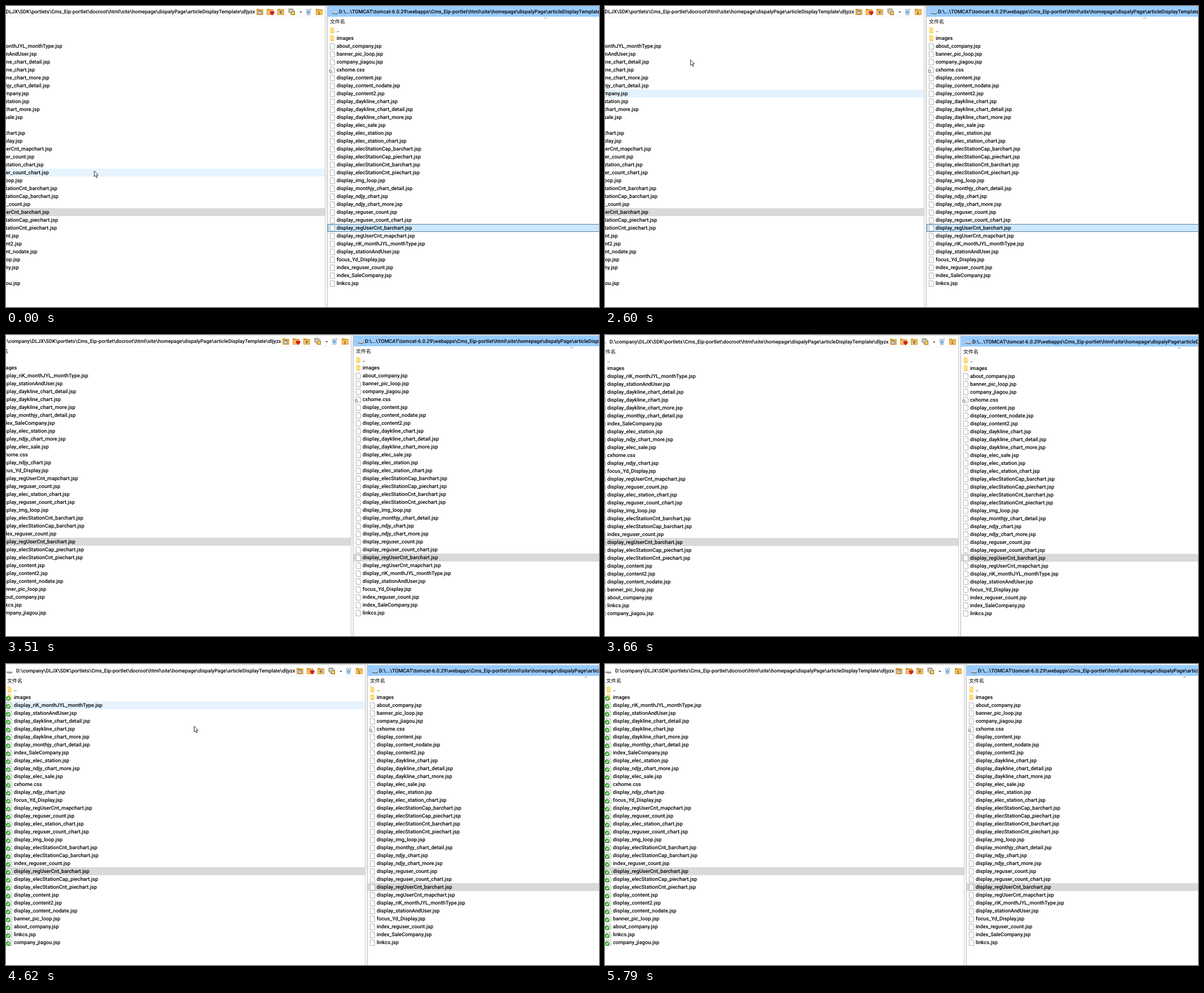
Recreate the animation shown at these times as an HTML page with a canvas. Size 1051 by 533 pixels, loop 7.13 s.

```html
<!DOCTYPE html>
<html lang="en">
<head>
<meta charset="utf-8">
<title>File lists</title>
<style>
html, body { margin: 0; width: 100%; height: 100%; overflow: hidden; background: #fff; }
canvas { display: block; }
</style>
</head>
<body>
<canvas id="stage" width="1051" height="533"></canvas>
<script>
const ctx = document.getElementById('stage').getContext('2d');
const LOOP = 7130, W = 1051, H = 533, ROW = 14, TOP = 45;
const FONT = '500 9.22px Roboto, "Open Sans", sans-serif';
const PATH_FONT = '500 8.98px Roboto, "Open Sans", sans-serif';
const CJK = '500 9px "Noto Sans CJK SC", "Noto Sans CJK", sans-serif';

// names without ".jsp"; "@" stands for "display_"
const expand = s => ['..', 'images'].concat(s.split(' ').map(n =>
  n.replace('@', 'display_') + (n.includes('.') ? '' : '.jsp')));

const leftList = expand('@riK_monthJYL_monthType @stationAndUser @daykline_chart_detail ' +
  '@daykline_chart @daykline_chart_more @monthjy_chart_detail index_SaleCompany @elec_station ' +
  '@ndjy_chart_more @elec_sale cxhome.css @ndjy_chart focus_Yd_Display @regUserCnt_mapchart ' +
  '@reguser_count @elec_station_chart @reguser_count_chart @img_loop @elecStationCnt_barchart ' +
  '@elecStationCap_barchart index_reguser_count @regUserCnt_barchart @elecStationCap_piechart ' +
  '@elecStationCnt_piechart @content @content2 @content_nodate banner_pic_loop about_company ' +
  'linkcs company_jiagou');
const rightList = expand('about_company banner_pic_loop company_jiagou cxhome.css @content ' +
  '@content_nodate @content2 @daykline_chart @daykline_chart_detail @daykline_chart_more ' +
  '@elec_sale @elec_station @elec_station_chart @elecStationCap_barchart ' +
  '@elecStationCap_piechart @elecStationCnt_barchart @elecStationCnt_piechart @img_loop ' +
  '@monthjy_chart_detail @ndjy_chart @ndjy_chart_more @reguser_count @reguser_count_chart ' +
  '@regUserCnt_barchart @regUserCnt_mapchart @riK_monthJYL_monthType @stationAndUser ' +
  'focus_Yd_Display index_reguser_count index_SaleCompany linkcs');
const tail = '\\html\\site\\homepage\\dispalyPage\\articleDisplayTemplate\\dljyzx';
const leftPath = 'D:\\company\\DLJX\\SDK\\portlets\\Cms_Eip-portlet\\docroot' + tail;
const rightPath = 'D:\\...\\TOMCAT\\tomcat-6.0.29\\webapps\\Cms_Eip-portlet' + tail;

// [time, cursor x, cursor y, hovered pane, hovered row]
const pointer = [
  [0, 156, 292, 'L', 18], [2180, 155, 287, 'L', 17], [2330, 154, 245, 'L', 15],
  [2450, 153, 157, 'L', 12], [2600, 151, 95, 'L', 8], [2720, 149, 50, 'L', 4],
  [2840, 147, 20, 'L', 1], [2960, 144, -3], [3110],
  [4620, 333, 110, 'L', 2], [4740, 400, 250, 'L', 9], [4860, 470, 379, 'L', 24],
  [5010, 520, 375, 'L', 24], [5130, 555, 369, 'L', 23], [5280, 579, 398, 'L', 24],
  [5400, 650, 424, 'R', 27], [5520, 712, 449, 'R', 29], [5670, 760, 491, 'R', 31], [5790]
];
// [time, dx, dy]
const pan = [[0, -71, -2], [3380, -48, -1.5], [3510, -25, -1], [3660, -10, -.5],
  [3785, -4, 0], [3910, -1, 0], [4060, 0, 0]];

const at = (steps, t) => steps.filter(s => s[0] <= t).pop();

function rect(x, y, w, h, color) {
  ctx.fillStyle = color;
  ctx.fillRect(x, y, w, h);
}
function label(s, x, y, font = FONT, color = '#000') {
  ctx.font = font;
  ctx.fillStyle = color;
  ctx.fillText(s, x, y);
}
function dot(x, y, r, color) {
  ctx.fillStyle = color;
  ctx.beginPath();
  ctx.arc(x, y, r, 0, 7);
  ctx.fill();
}
function path(pts, fill, stroke, width = 1, closed = true) {
  ctx.beginPath();
  pts.forEach(([x, y]) => ctx.lineTo(x, y));
  if (closed) ctx.closePath();
  if (fill) { ctx.fillStyle = fill; ctx.fill(); }
  if (stroke) { ctx.strokeStyle = stroke; ctx.lineWidth = width; ctx.stroke(); }
}

function page(x, y) {
  path([[x + .5, y - 5], [x + 6, y - 5], [x + 8.5, y - 2.5], [x + 8.5, y + 5.5], [x + .5, y + 5.5]],
    '#fdfdfd', '#a3a3a3', .8);
  path([[x + 6, y - 5], [x + 6, y - 2.5], [x + 8.5, y - 2.5]], null, '#b4b4b4', .6, false);
}
function folder(x, y) {
  rect(x + 1, y - 5, 5, 10, '#f6cf62');
  rect(x + 2, y - 4, 6, 9, '#ffdf83');
  rect(x + 1, y + 4, 7, 1, '#eec058');
}
function check(x, y) {
  dot(x, y, 4.2, '#2b9f25');
  dot(x, y - .6, 3.1, '#4cbb3d');
  path([[x - 2, y + .2], [x - .6, y + 1.7], [x + 2.2, y - 1.8]], null, '#fff', 1.2, false);
}
function gear(x, y) {
  dot(x, y, 2.9, '#9aa8b4');
  dot(x, y, 1.6, '#cfe4f2');
}
function drive(x, y) {
  path([[x, y], [x + 3, y - 2], [x + 10, y - .5], [x + 10, y + 1.5], [x + 7, y + 3], [x, y + 1.5]], '#6d747a');
  path([[x, y], [x + 3, y - 2], [x + 10, y - .5], [x + 7, y + 1]], '#d8dde0');
}

function toolFolder(x) {
  rect(x, 7, 5, 2, '#d79b35');
  rect(x, 8, 12, 10, '#d79b35');
  rect(x + 1, 10, 10, 7, '#f5c365');
}
function toolbar() {
  toolFolder(515);
  dot(521, 13.5, 3.5, '#555');
  dot(521, 13.5, 2.6, '#fff');
  path([[521, 11.5], [521, 13.7], [522.8, 13.7]], null, '#333', .8, false);

  toolFolder(533);
  dot(541, 13.5, 2.4, '#d3202a');
  dot(544.4, 13.5, 2.4, '#d3202a');
  path([[538.9, 14.6], [546.5, 14.6], [542.7, 18.8]], '#d3202a');

  toolFolder(552);
  path([[558, 10.5], [561, 13.5], [559, 13.5], [559, 16], [557, 16], [557, 13.5], [555, 13.5]], '#68717d');

  rect(571.5, 6.5, 8, 7, '#77808a');
  rect(572.5, 7.5, 6, 5, '#f8e58a');
  rect(573.5, 8.5, 8, 7, '#77808a');
  rect(574.5, 9.5, 6, 5, '#fff');
  rect(576, 11, 7, 7, '#8b6a20');
  rect(577, 12, 5, 5, '#f6cf52');

  path([[591.5, 12], [595.5, 12], [593.5, 14.2]], '#222');

  path([[603, 8], [611, 8], [609.8, 18], [604.5, 18]], '#d4e6f1', '#94abb9', .8);
  path([[605, 13], [607, 10.5], [609, 13], [607, 15.5]], null, '#368fd2', 1.2);
  dot(611, 7.5, 1, '#9fb4c0');

  toolFolder(620);
  label('S', 623.8, 16.7, 'bold 7px "Open Sans", sans-serif', '#8d5a10');
}

function rows(list, x, iconX, checked) {
  list.forEach((name, i) => {
    const y = TOP + i * ROW;
    if (i < 2) folder(iconX, y); else page(iconX, y);
    if (checked && i) check(iconX + 2, y + 2);
    else if (name.endsWith('.css')) gear(iconX + 1, y + 2.5);
    label(name, x, y + 3.4);
  });
}
const bar = (x, w, row, color) => rect(x, TOP - 7 + row * ROW, w, ROW, color);

function leftPane(t, hover) {
  ctx.save();
  ctx.beginPath();
  ctx.rect(-80, -5, 716, 560);
  ctx.clip();
  if (t >= 2840 && t < 2960) rect(0, 22, 636, 20, '#d9ebf9');
  else if (t >= 2960 && t < 3380) rect(0, 22, 636, 20, '#fafafa');
  rect(0, 21, 636, 1, '#f2f2f2');
  bar(0, 636, 23, '#d9d9d9');
  if (hover >= 0) bar(0, 636, hover, hover === 23 ? '#cce8ff' : '#e5f3ff');
  drive(1, 14);
  label(leftPath, 18, 15.4, PATH_FONT);
  toolbar();
  label('文件名', 2, 33.3, CJK);
  rows(leftList, 14, 2, true);
  ctx.restore();
}

function rightPane(t, hover) {
  rect(641, 2, 490, 19, '#99ccff');
  drive(649, 14);
  label(rightPath, 661, 15.4, PATH_FONT);
  path([[1025, 24.5], [1027.5, 22.3], [1030, 24.5]], null, '#666', .8, false);
  label('文件名', 645, 33.3, CJK);
  if (t < 3380) {
    bar(641, 490, 25, '#cce8ff');
    ctx.strokeStyle = '#56819f';
    ctx.lineWidth = 1;
    ctx.strokeRect(641.5, 388.5, 490, 13);
  } else bar(641, 490, 25, '#d9d9d9');
  if (hover >= 0) bar(641, 490, hover, '#e5f3ff');
  rows(rightList, 657, 645, false);
}

function frameLines() {
  rect(0, 0, 1130, 2, '#f3f3f3');
  rect(381, 0, 255, 2, '#e2e2e2');
  rect(636, 0, 5, 560, '#f0f0f0');
  rect(636, 0, 1, 560, '#d2d2d2');
  rect(640, 0, 1, 560, '#bdbdbd');
  rect(637, 372, 3, 180, '#f8f8f8');
}

function arrow(x, y) {
  path([[0, 0], [0, 10.2], [2.3, 8.1], [4, 12], [5.6, 11.3], [4, 7.6], [7, 7.4]]
    .map(p => [x + .5 + p[0], y + p[1]]), '#fff', '#222', .9);
}

function draw(t) {
  const [, dx, dy] = at(pan, t);
  const [, cx, cy, pane, row] = at(pointer, t);
  rect(0, 0, W, H, '#fff');
  ctx.save();
  ctx.translate(dx, dy);
  ctx.textRendering = 'geometricPrecision';
  leftPane(t, pane === 'L' ? row : -1);
  frameLines();
  rightPane(t, pane === 'R' ? row : -1);
  ctx.restore();
  if (cx !== undefined) arrow(cx, cy);
}

const start = performance.now();
function tick() {
  draw((performance.now() - start) % LOOP);
  requestAnimationFrame(tick);
}
tick();
</script>
</body>
</html>
```
